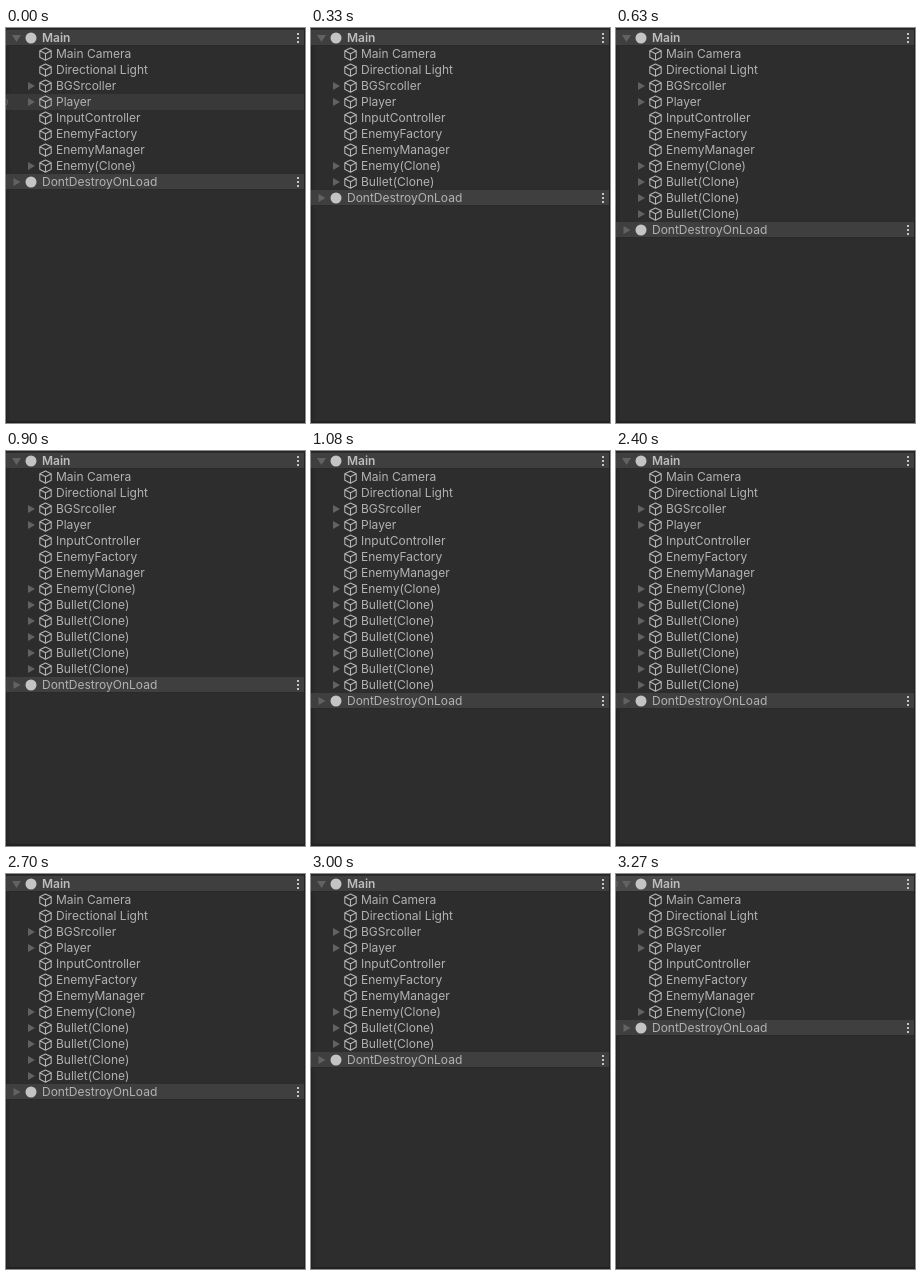
An HTML page for the animation above (3.63 s loop, 299 px wide and 395 px high).

```html
<!DOCTYPE html>
<html lang="en">
<head>
<meta charset="utf-8">
<style>
html, body { margin: 0; width: 100%; height: 100%; overflow: hidden; background: #2d2d2d; }
svg { display: block; width: 299px; height: 395px; }
text { font: 12px Inter, sans-serif; fill: #b2b2b2; }
.title { font-weight: 600; fill: #bdbdbd; }
.cube { fill: none; stroke: #b4b4b4; stroke-width: 1.1; stroke-linejoin: round; }
.arrow { fill: #626262; }
.scene, .dots { fill: #c4c4c4; }
</style>
</head>
<body>
<svg id="stage" viewBox="0 0 299 395">
  <defs>
    <path id="cube" class="cube" d="M39.5 -6 45.2 -3.2V3.2L39.5 6.2 33.8 3.2V-3.2ZM33.8 -3.2 39.5 -.2 45.2 -3.2M39.5 -.2V6.2"/>
    <path id="closed" class="arrow" d="M0 -4 7 0 0 4Z"/>
    <path id="open" class="arrow" d="M6 -3H15L10.5 4Z"/>
    <g id="dots" class="dots">
      <rect x="291" y="-5" width="2" height="2"/>
      <rect x="291" y="-1" width="2" height="2"/>
      <rect x="291" y="3" width="2" height="2"/>
    </g>
  </defs>
  <rect width="299" height="395" fill="#2d2d2d"/>
  <rect width="4" height="395" fill="#292929"/>
  <rect width="1" height="395" fill="#222"/>
  <rect width="299" height="1" fill="#252525"/>
  <rect y="393" width="299" height="2" fill="#222"/>
  <rect id="hover" width="299" height="16"/>
  <g id="rows"></g>
  <circle id="hand" cx="-2" r="3.5" fill="none" stroke="#666"/>
  <rect x="298" width="1" height="395" fill="#222"/>
</svg>
<script>
const LOOP = 3630, ROW = 16, FIRST_BULLET = 8;
const spawns = [330, 480, 630, 780, 900, 1080, 1230];
const removals = [2400, 2550, 2700, 2850, 3000, 3150, 3270];
const items = ["Main Camera", "Directional Light", ">BGSrcoller", ">Player",
  "InputController", "EnemyFactory", "EnemyManager", ">Enemy(Clone)"];
const $ = id => document.getElementById(id);
const rowY = i => 10 + ROW * i;
const place = (el, i) => el.setAttribute("transform", `translate(0 ${rowY(i)})`);
const show = (el, on) => el.setAttribute("visibility", on ? "visible" : "hidden");

function addRow(i, markup) {
  const g = document.createElementNS("http://www.w3.org/2000/svg", "g");
  g.innerHTML = markup;
  place(g, i);
  $("rows").append(g);
  return g;
}

function addItem(i, name) {
  const arrow = name[0] === ">" ? '<use href="#closed" x="22"/>' : "";
  return addRow(i, `${arrow}<use href="#cube"/><text x="50" y="4">${name.replace(">", "")}</text>`);
}

function addScene(i, name, isOpen) {
  const arrow = isOpen ? '<use href="#open"/>' : '<use href="#closed" x="7.5"/>';
  const bar = isOpen ? "" : '<rect y="-8" width="299" height="16" fill="#3f3f3f"/>';
  return addRow(i, `${bar}<path d="M0 7.5H299" stroke="#2a2a2a"/>${arrow}
    <circle class="scene" cx="25" r="5.5"/>
    <text x="36" y="4" class="${isOpen ? "title" : ""}">${name}</text><use href="#dots"/>`);
}

const mainBar = document.createElementNS("http://www.w3.org/2000/svg", "rect");
mainBar.setAttribute("y", 2);
mainBar.setAttribute("width", 299);
mainBar.setAttribute("height", 16);
$("rows").append(mainBar);
addScene(0, "Main", true);
items.forEach((name, i) => addItem(i + 1, name));
const bullets = spawns.map((_, i) => addItem(FIRST_BULLET + 1 + i, ">Bullet(Clone)"));
const persistent = addScene(FIRST_BULLET + 1, "DontDestroyOnLoad", false);

const passed = (times, t) => times.filter(at => t >= at).length;

// Row under the pointer, or -1.
function hoveredRow(t) {
  if (t < 30) return 4;
  if (t < 60) return 3;
  return t >= 3270 ? 0 : -1;
}

function render(t) {
  const count = passed(spawns, t) - passed(removals, t);
  bullets.forEach((b, i) => show(b, i < count));
  place(persistent, FIRST_BULLET + 1 + count);

  const row = hoveredRow(t);
  show($("hover"), row > 0);
  show($("hand"), row >= 0);
  $("hover").setAttribute("y", rowY(row) - 8);
  $("hover").setAttribute("fill", "#393939");
  $("hand").setAttribute("cy", rowY(row));
  mainBar.setAttribute("fill", row === 0 ? "#4a4a4a" : "#3f3f3f");
}

const start = performance.now();
function tick() {
  render((performance.now() - start) % LOOP);
  requestAnimationFrame(tick);
}
render(0);
requestAnimationFrame(tick);
</script>
</body>
</html>
```
